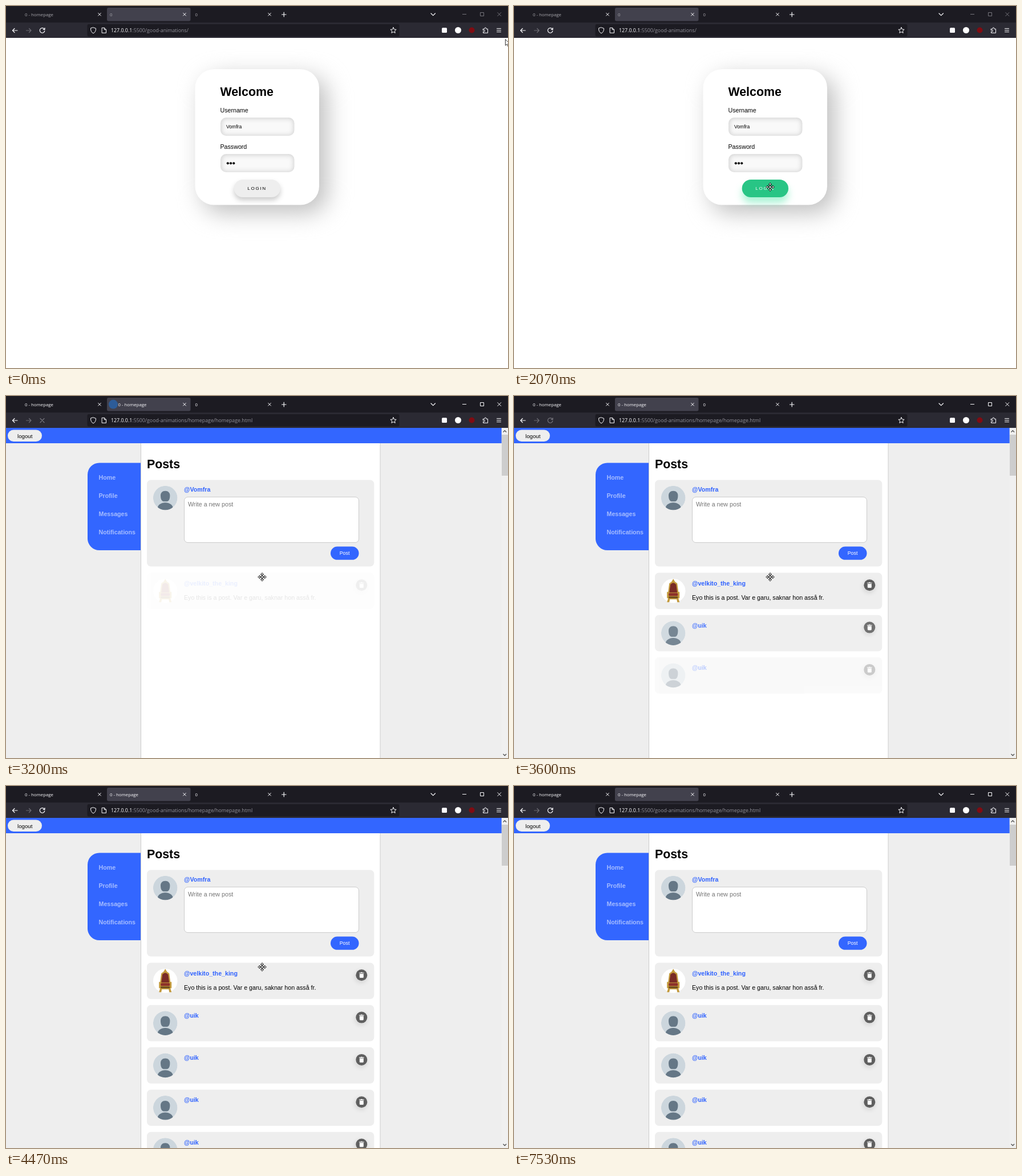
Recreate the animation shown at these times as an HTML page. Size 880 by 636 pixels, loop 7940 ms.

```html
<!DOCTYPE html>
<html lang="en">
<head>
<meta charset="utf-8">
<title>Login to homepage</title>
<style>
  html, body { margin: 0; width: 100%; height: 100%; overflow: hidden; background: #fff; }
  svg { display: block; --tab: #a9a8ae; --win: #75747b; }
  svg.focused { --tab: #fbfbfe; --win: #fbfbfe; }
  text { font: 10.667px "Liberation Sans", Arial, sans-serif; white-space: pre; }
  .ui text { font-family: "Open Sans", "Noto Sans", sans-serif; }
  .ui .tab { font-size: 7.8px; fill: var(--tab); }
  .ui .url { font-size: 8.82px; fill: #fbfbfe; }
  .line { fill: none; stroke: #fbfbfe; stroke-width: 1; stroke-linecap: round; stroke-linejoin: round; }
  .win { fill: none; stroke: var(--win); stroke-width: 1; }
  .bold { font-weight: bold; }
  .title { font-size: 21.333px; font-weight: bold; }
  .user { font-weight: bold; fill: #2f62ff; }
  .nav text { font-weight: bold; fill: #a6bdff; }
</style>
</head>
<body>
<svg id="stage" width="880" height="636" viewBox="0 0 880 636" xmlns="http://www.w3.org/2000/svg">
  <defs>
    <clipPath id="fieldClip"><rect width="129.5" height="32" rx="10"/></clipPath>
    <clipPath id="faceClip"><circle r="21.3"/></clipPath>
    <g id="field" clip-path="url(#fieldClip)">
      <rect width="129.5" height="32" fill="#f9f9f9"/>
      <rect x="-4" y="-4" width="138" height="41" rx="13" fill="none" stroke="#cfcfcf" stroke-width="11" style="filter:blur(4px)"/>
    </g>
    <g id="face" clip-path="url(#faceClip)">
      <circle r="21.3" fill="#ccd6dd"/>
      <path d="M0-12.3C5-12.3 8.2-9 8.2-4.2C8.2 3 5.6 6.3 3 6.3H-3C-5.6 6.3-8.2 3-8.2-4.2C-8.2-9-5-12.3 0-12.3Z" fill="#657786"/>
      <ellipse cy="18.5" rx="13.6" ry="10.2" fill="#657786"/>
    </g>
    <g id="throne">
      <circle r="21.3" fill="#fff"/>
      <path d="M-7-13L-3-16L0-21L3-16L7-13L9 2H11V13H9L11 20H7L6 15H-6L-7 20H-11L-9 13H-11V2H-9Z" fill="#c39a3c"/>
      <path d="M-5-11Q0-17 5-11L7 3H-7Z" fill="#7a2b25"/>
      <rect x="-8" y="4" width="16" height="5" rx="1.5" fill="#8c3029"/>
      <rect x="-8" y="10" width="16" height="3" fill="#6b4a1d"/>
    </g>
    <g id="bin">
      <circle cx="-1" cy="3" r="10.5" fill="#000" opacity=".11" style="filter:blur(4px)"/>
      <circle r="10" fill="#5f5f5f"/>
      <path d="M-4.2-4.4H-1.6L-1-5.1H1L1.6-4.4H4.2V-3.2H-4.2ZM-3.5-2.4H3.5V3.5Q3.5 4.8 2.2 4.8H-2.2Q-3.5 4.8-3.5 3.5Z" fill="#fff"/>
    </g>
    <path id="x" d="M-2.4-2.4L2.4 2.4M2.4-2.4L-2.4 2.4" class="line"/>
  </defs>

  <g id="login">
    <rect x="331.5" y="111" width="217.5" height="238.5" rx="33" fill="#bebebe" transform="translate(13.3 13.3)" style="filter:blur(20px)"/>
    <rect x="331.5" y="111" width="217.5" height="238.5" rx="33" fill="#fff"/>
    <text x="375.5" y="158" class="title">Welcome</text>
    <text x="375.5" y="187">Username</text>
    <use href="#field" x="376" y="196"/>
    <text x="386" y="215" style="font-size:8.6px">Vomfra</text>
    <text x="375.5" y="250.7">Password</text>
    <use href="#field" x="376" y="260"/>
    <circle cx="388.8" cy="276.3" r="2.1"/><circle cx="394" cy="276.3" r="2.1"/><circle cx="399.2" cy="276.3" r="2.1"/>
    <rect id="glow" x="399.7" y="305" width="81.3" height="31" rx="15.5"/>
    <rect id="button" x="399.7" y="305" width="81.3" height="31" rx="15.5"/>
    <text id="label" x="423.3" y="323.3" style="font-size:8.1px;letter-spacing:1.67px">LOGIN</text>
  </g>

  <g id="home">
    <rect y="56" width="880" height="580" fill="#eee"/>
    <rect x="236.5" y="56" width="419.5" height="590" fill="#fff" stroke="#ccc"/>
    <rect y="56" width="869" height="27" fill="#36f"/>
    <rect x="3" y="59.5" width="60" height="20.5" rx="10.2" fill="#eee"/>
    <text x="20" y="73.5" style="font-size:9.7px">logout</text>
    <path d="M236 117.5H163.500A20.500 20.500 0 0 0 143 138V250.500A20.500 20.500 0 0 0 163.500 271H236Z" fill="#36f"/>
    <g class="nav">
      <text x="162.500" y="147.300">Home</text>
      <text x="162.500" y="179.200">Profile</text>
      <text x="162.500" y="211">Messages</text>
      <text x="162.500" y="242.800">Notifications</text>
    </g>
    <text x="247" y="127.300" class="title">Posts</text>
    <rect x="247" y="147.500" width="398.300" height="152" rx="7" fill="#eee"/>
    <use href="#face" x="279.200" y="179"/>
    <text x="312" y="168.300" class="user">@Vomfra</text>
    <rect x="312.500" y="177.500" width="306" height="80" rx="6.500" fill="#fff" stroke="#ccc"/>
    <text x="319" y="193.600" fill="#757575">Write a new post</text>
    <rect x="569" y="264.500" width="49.500" height="23.300" rx="11.650" fill="#36f"/>
    <text x="584.700" y="279.300" fill="#fff" style="font-size:8.890px">Post</text>
    <g id="posts"></g>
    <rect x="868.700" y="56" width="11.300" height="580" fill="#f0f0f0"/>
    <rect x="869" y="68" width="11" height="72" fill="#cdcdcd"/>
    <path d="M871.500 63.500L874.300 60.700L877.100 63.500M871.500 629L874.300 631.800L877.100 629" fill="none" stroke="#505050" stroke-width="1.300"/>
  </g>

  <g id="status" class="ui">
    <rect y="622" width="175" height="14" fill="#2b2a33"/>
    <text x="3" y="632.500" fill="#fbfbfe" style="font-size:7.100px">127.0.0.1</text>
  </g>

  <g class="ui">
    <rect width="880" height="56" fill="#2b2a33"/>
    <rect width="880" height="29" fill="#1c1b22"/>
    <rect x="177" y="3" width="146.500" height="23.500" rx="2.700" fill="#42414d"/>
    <rect x="142.500" y="32" width="547" height="21.500" rx="2.700" fill="#1c1b22"/>
    <text x="33" y="17.800" class="tab">0 - homepage</text>
    <text id="tabTitle" y="17.800" class="tab"></text>
    <text x="331.500" y="17.800" class="tab">0</text>
    <circle id="busy"/>
    <use href="#x" x="164" y="14.700"/><use href="#x" x="313" y="14.700"/><use href="#x" x="462" y="14.700"/>
    <path d="M483.500 15H491M487.200 11.200V18.800M745 13L748.700 16.700L752.400 13" class="line" style="stroke-width:1.200"/>
    <path d="M800 14.500H807M831.500 11.500H837.500V17.500H831.500ZM861.500 11.300L868 17.800M868 11.300L861.500 17.800" class="win"/>
    <path d="M20 43H11.500M15 39.500L11.500 43L15 46.500" class="line" style="stroke-width:1.200"/>
    <path d="M35.500 43H44M40.500 39.500L44 43L40.500 46.500" class="line" style="stroke:#6d6c74;stroke-width:1.200"/>
    <path id="reload" d="M67.300 40.800A4.300 4.300 0 1 0 67.800 43.600M68 38.500V41.300H65.200" class="line" style="stroke-width:1.200"/>
    <path id="stop" d="M60 39.500L67 46.500M67 39.500L60 46.500" class="line" style="stroke-width:1.200"/>
    <path d="M153 37.800L157.500 39.300C157.700 43.500 156.200 46.500 153 48C149.800 46.500 148.300 43.500 148.500 39.300Z" class="line"/>
    <path d="M168.500 38.300H172.500L175.500 41.300V47.300H168.500ZM172.300 38.500V41.500H175.300" class="line"/>
    <text x="184" y="46.300" class="url">127.0.0.1<tspan id="path" fill="#92919a"></tspan></text>
    <path id="star" class="line"/>
    <rect x="764" y="38.300" width="9" height="8.700" rx="1.500" fill="#fbfbfe"/>
    <circle cx="792.500" cy="42.500" r="5.500" fill="#fff"/>
    <circle cx="816.500" cy="42.500" r="5" fill="#800c12"/>
    <path d="M836.500 40.300H839V39.300A1.400 1.400 0 0 1 841.800 39.300V40.300H844.500V47.300H836.500V45H838A1.300 1.300 0 0 0 838 42.400H836.500Z" class="line"/>
    <path d="M860.500 39.500H867.500M860.500 42.500H867.500M860.500 45.500H867.500" class="line"/>
  </g>

  <path id="arrow" d="M.400.500V11.300L2.900 9L4.600 12.700L6.200 12L4.600 8.400H7.900Z" fill="#fff" stroke="#000" stroke-width=".800"/>
  <g id="move" fill="#fff" stroke="#000" stroke-width=".900"></g>
</svg>
<script>
const LOOP = 7940, FPS = 15;
const $ = id => document.getElementById(id);
const clamp = v => Math.max(0, Math.min(1, v));
const mix = (a, b, k) => a + (b - a) * k;
const show = (id, on) => $(id).style.display = on ? '' : 'none';
const rgba = (a, b, k) => `rgba(${a.map((v, i) => mix(v, b[i], k)).join()})`;

// CSS "ease" curve: cubic-bezier(.25, .1, .25, 1)
function ease(x) {
  x = clamp(x);
  if (x === 0 || x === 1) return x;
  const bez = (s, a, b) => 3 * s * (1 - s) ** 2 * a + 3 * s * s * (1 - s) * b + s ** 3;
  let lo = 0, hi = 1;
  for (let i = 0; i < 20; i++) {
    const m = (lo + hi) / 2;
    if (bez(m, .25, .25) < x) lo = m; else hi = m;
  }
  return bez(lo, .1, 1);
}

// Smooth path through [time, x, y] keys, at rest at both ends
function along(keys, t) {
  const last = keys.length - 1;
  if (t <= keys[0][0]) return keys[0].slice(1);
  if (t >= keys[last][0]) return keys[last].slice(1);
  const i = keys.findIndex(k => k[0] > t) - 1;
  const a = keys[i], b = keys[i + 1], d = b[0] - a[0], s = (t - a[0]) / d;
  const slope = (j, c) => j === 0 || j === last ? 0 :
    (keys[j + 1][c] - keys[j - 1][c]) / (keys[j + 1][0] - keys[j - 1][0]);
  return [1, 2].map(c => {
    const k = s * s * (3 - 2 * s);
    return mix(a[c], b[c], k) + d * (s * (1 - s) ** 2 * slope(i, c) - s * s * (1 - s) * slope(i + 1, c));
  });
}

const toButton = [[803, 875, 58], [1200, 743, 176], [1600, 516, 298], [2000, 449, 318]];
const toCorner = [[6667, 449, 318], [7467, 58, 635]];

function build() {
  let html = '';
  for (let i = 0; i < 5; i++) {
    const y = 310.5 + 74.3 * i;
    html += `<g><rect x="247" y="${y}" width="398.3" height="63.7" rx="7" fill="#eee"/>
      <use href="#${i ? 'face' : 'throne'}" x="279.2" y="${y + 31.8}"/>
      <text x="312" y="${y + 22}" class="user">${i ? '@uik' : '@velkito_the_king'}</text>
      ${i ? '' : `<text x="312" y="${y + 47}">Eyo this is a post. Var e garu, saknar hon asså fr.</text>`}
      <use href="#bin" x="623.3" y="${y + 21.8}"/></g>`;
  }
  $('posts').innerHTML = html;

  let star = '';
  for (let i = 0; i < 10; i++) {
    const r = i % 2 ? 2.5 : 5.4, a = Math.PI * (i / 5 - .5);
    star += (i ? 'L' : 'M') + (679 + r * Math.cos(a)) + ' ' + (43 + r * Math.sin(a));
  }
  $('star').setAttribute('d', star + 'Z');

  let arms = '';
  for (let i = 0; i < 4; i++)
    arms += `<path d="M-.8-2V-4.300H-2.700L0-7.300L2.700-4.300H.8V-2" transform="rotate(${i * 90})"/>`;
  $('move').innerHTML = arms + '<circle r="1.900"/>';
}

function drawButton(t) {
  const k = ease((t - 1800) / 330);
  $('button').style.fill = rgba([238, 238, 238, 1], [35, 196, 131, 1], k);
  $('label').style.fill = rgba([0, 0, 0, 1], [255, 255, 255, 1], k);
  const glow = $('glow').style;
  glow.fill = rgba([0, 0, 0, .2], [46, 229, 157, .4], k);
  glow.transform = `translateY(${mix(5.3, 10, k)}px)`;
  glow.filter = `blur(${mix(4.5, 6.67, k)}px)`;
}

function drawBrowser(t) {
  const loading = t >= 3066, burst = t >= 3199, done = t >= 3333;
  $('stage').classList.toggle('focused', t >= 2933);
  $('tabTitle').textContent = loading ? '0 - homepage' : '0';
  $('tabTitle').setAttribute('x', loading && !done ? 196.5 : 182);
  $('path').textContent = ':5500/good-animations/' + (loading ? 'homepage/homepage.html' : '');
  show('status', loading && !burst);
  show('stop', loading && !done);
  show('reload', !loading || done);
  $('stop').style.stroke = burst ? '#77767e' : '#fbfbfe';
  $('reload').style.stroke = done && t < 3866 ? '#77767e' : '#fbfbfe';

  const busy = $('busy');
  show('busy', loading && !done);
  busy.setAttribute('cx', burst ? 188 : mix(186, 188.5, clamp((t - 3066) / 67)));
  busy.setAttribute('cy', 14.6);
  busy.setAttribute('r', burst ? 8 : 1.7);
  busy.setAttribute('fill', burst ? '#2d5c98' : '#c9c9d0');
  busy.setAttribute('opacity', t > 3250 ? .4 : 1);
}

function drawCursor(t) {
  const leaving = t > 6700;
  const [x, y] = along(leaving ? toCorner : toButton, t);
  const onButton = !leaving && x < 480;
  show('move', onButton);
  show('arrow', !onButton && t < 7500);
  $(onButton ? 'move' : 'arrow').setAttribute('transform', `translate(${x} ${y})`);
}

function draw(t) {
  const home = t >= 3199;
  show('login', !home);
  show('home', home);
  drawButton(t);
  drawBrowser(t);
  drawCursor(t);
  [...$('posts').children].forEach((p, i) => {
    p.style.opacity = ease((t - 3155 - 175 * i) / 450);
  });
}

build();
const start = performance.now();
function tick() {
  const t = (performance.now() - start) % LOOP;
  draw(Math.floor(t * FPS / 1000 + .051) * 1000 / FPS);
  requestAnimationFrame(tick);
}
tick();
</script>
</body>
</html>
```
